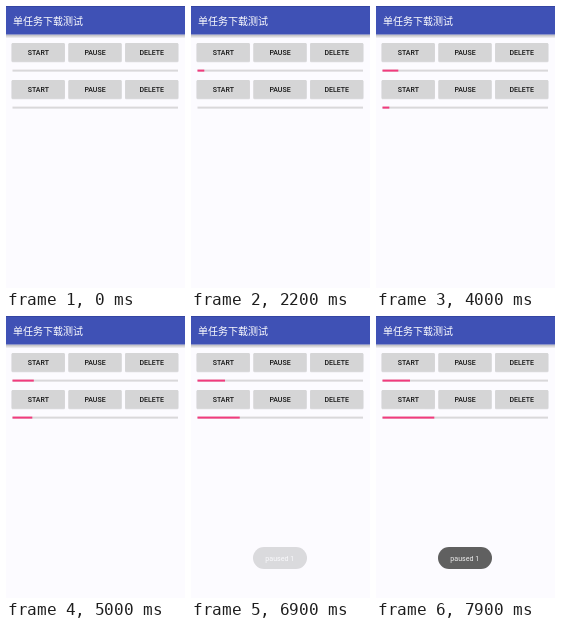
Write an HTML page that moves like this. It is 179 px wide and 282 px high and loops after 8 s.

```html
<!DOCTYPE html>
<html lang="zh">
<head>
<meta charset="utf-8">
<title>单任务下载测试</title>
<style>
  html, body { margin: 0; width: 100%; height: 100%; overflow: hidden; background: #fcfbff; }
  svg { display: block; width: 100%; height: 100%; }
  .title { font: 10px "Noto Sans CJK SC", "Noto Sans CJK", sans-serif; fill: #fff; }
  .label { font: 500 7px Roboto, sans-serif; fill: #161616; text-anchor: middle; }
  .button { fill: #d5d5d6; }
  .track { fill: #d9d8da; }
  .fill { fill: #f23a7d; width: 0; animation: 8s steps(10) infinite; }
  .first { animation-name: first; }
  .second { animation-name: second; }
  .toast { opacity: 0; animation: toast 8s steps(4) infinite; }
  .toast text { font: 7.1px Roboto, sans-serif; fill: #ededed; text-anchor: middle; }

  @keyframes first {
    0%, 13.75% { width: 0; }
    27.5% { width: 6.8px; }
    50% { width: 15.8px; }
    62.5% { width: 21.3px; }
    76.25% { width: 26.5px; }
    82.5%, 100% { width: 27.5px; }
  }
  @keyframes second {
    0%, 43.75% { width: 0; }
    50% { width: 6.8px; }
    62.5% { width: 19.8px; }
    76.25% { width: 34.4px; }
    90% { width: 45.6px; }
    98.75%, 100% { width: 51.8px; }
  }
  @keyframes toast {
    0%, 85% { opacity: 0; }
    90% { opacity: .86; }
    92.5%, 100% { opacity: 1; }
  }
</style>
</head>
<body>
<svg viewBox="0 0 179 282" preserveAspectRatio="none">
  <defs>
    <linearGradient id="shade" x2="0" y2="1">
      <stop stop-color="#000" stop-opacity=".28"/>
      <stop offset="1" stop-color="#000" stop-opacity="0"/>
    </linearGradient>
    <g id="row">
      <g fill="#000" opacity=".12">
        <rect x="5.5" y="37.5" width="53.5" height="18.8" rx="1"/>
        <rect x="62.3" y="37.5" width="53.5" height="18.8" rx="1"/>
        <rect x="119" y="37.5" width="53.5" height="18.8" rx="1"/>
      </g>
      <g class="button">
        <rect x="5.7" y="37" width="53" height="18.6" rx="1"/>
        <rect x="62.5" y="37" width="53" height="18.6" rx="1"/>
        <rect x="119.2" y="37" width="53" height="18.6" rx="1"/>
      </g>
      <g class="label">
        <text x="32.3" y="49">START</text>
        <text x="89" y="49">PAUSE</text>
        <text x="145.8" y="49">DELETE</text>
      </g>
      <rect class="track" x="6.5" y="63.6" width="165.5" height="2"/>
    </g>
  </defs>
  <rect width="179" height="282" fill="#fcfbff"/>
  <rect y="28.5" width="179" height="4" fill="url(#shade)"/>
  <rect width="179" height="28.5" fill="#3f51b5"/>
  <rect width="179" height="1" fill="#3444a2"/>
  <text class="title" x="7" y="19">单任务下载测试</text>
  <use href="#row"/>
  <use href="#row" y="37"/>
  <rect class="fill first" x="6.5" y="63.6" height="2"/>
  <rect class="fill second" x="6.5" y="100.6" height="2"/>
  <g class="toast">
    <rect x="62" y="231" width="54" height="22" rx="11" fill="#606060"/>
    <text x="88.8" y="244.6">paused 1</text>
  </g>
</svg>
</body>
</html>
```
